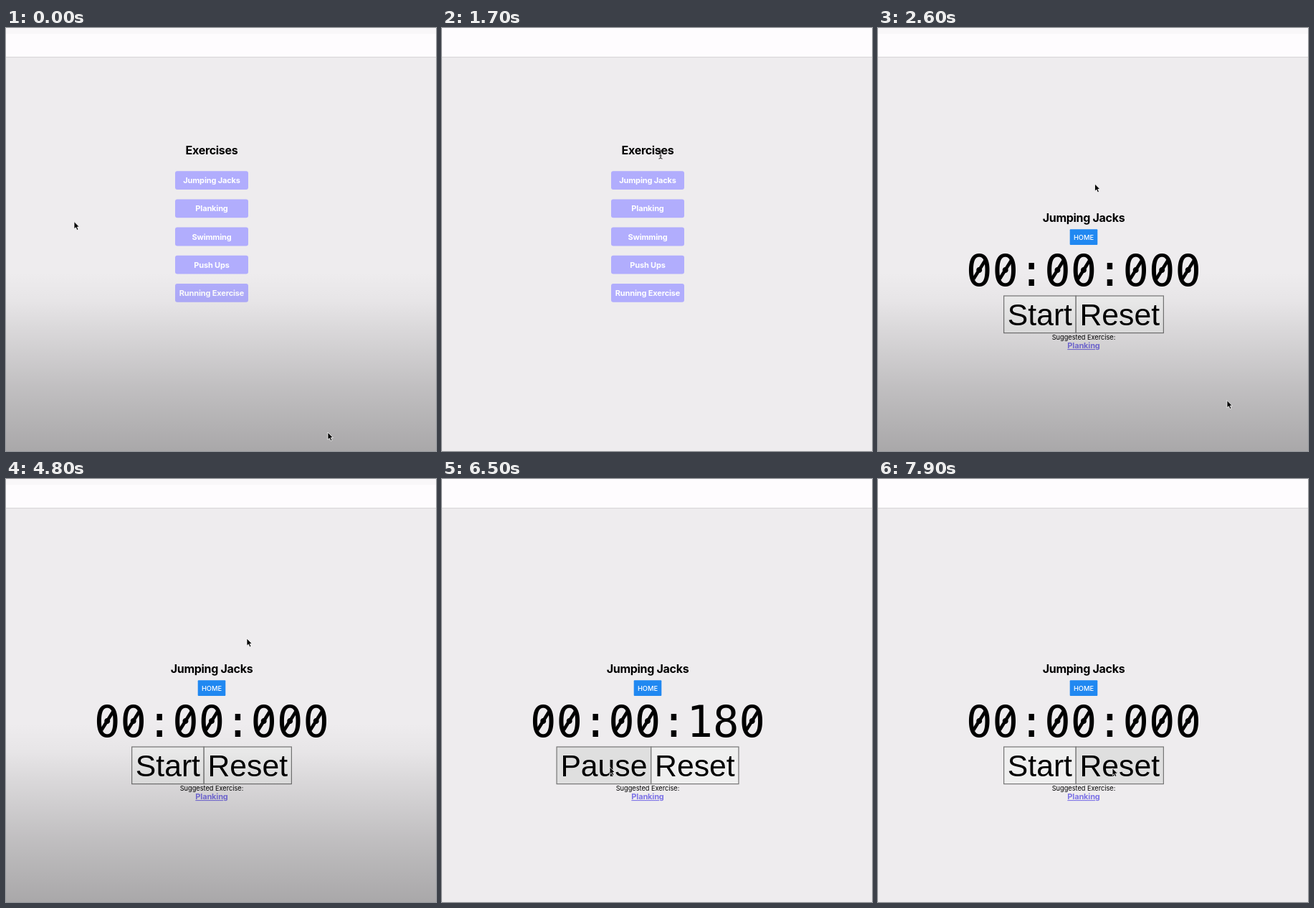
Recreate the animation shown at these times as an HTML page. Size 600 by 589 pixels, loop 8 s.

```html
<!DOCTYPE html>
<html lang="en">
<head>
<meta charset="utf-8">
<title>Exercises</title>
<style>
  html, body { margin: 0; width: 100%; height: 100%; overflow: hidden; background: #eeecee; }
  svg { display: block; width: 100%; height: 100%; }
  text { font-family: Inter, Roboto, sans-serif; text-anchor: middle; }
  .title { font-size: 16px; font-weight: 700; letter-spacing: -.3px; }
  .item { font-size: 11px; font-weight: 700; letter-spacing: -.15px; fill: #fff; }
  .home { font-size: 9.3px; font-weight: 500; fill: #fff; }
  .hint { font-size: 9.2px; }
  .link { font-size: 11px; font-weight: 700; letter-spacing: -.15px; fill: #7d73e6; text-decoration: underline; }
  .digits { font: 60.5px "DejaVu Sans Mono", monospace; }
  .label { font: 42.7px "Liberation Sans", Arial, sans-serif; }
  .btn { stroke: #767676; stroke-width: 1.2; }
</style>
</head>
<body>
<svg viewBox="0 0 600 589">
  <defs>
    <linearGradient id="shade" x1="0" y1="0" x2="0" y2="1">
      <stop offset="0" stop-opacity="0"/>
      <stop offset=".16" stop-opacity=".03"/>
      <stop offset=".32" stop-opacity=".085"/>
      <stop offset=".64" stop-opacity=".19"/>
      <stop offset="1" stop-opacity=".29"/>
    </linearGradient>
    <path id="arrow" d="M0 0V10.2L2.4 8.2L4.1 12L6 11.1L4.3 7.5H7.4Z" stroke="#fff" stroke-width=".8" stroke-linejoin="round"/>
    <path id="beam" d="M-2.5 -6Q0 -6 0 -4.5Q0 -6 2.5 -6M0 -5V5M-2.5 6Q0 6 0 4.5Q0 6 2.5 6M-1.5 2H1.5" fill="none" stroke="#222"/>
    <path id="hand" d="M0 0Q1.2 -1 2 0V4L6.5 5.2Q7.5 5.6 7 8L6 11.5H1L-2.5 7Q-2.5 5.5 0 7Z" fill="#fff" stroke="#000" stroke-width=".9"/>
  </defs>
  <rect width="600" height="589" fill="#eeecee"/>
  <rect width="600" height="40" fill="#fefcfe"/>
  <rect y="40" width="600" height="1.2" fill="#d9d7d9"/>
  <g id="list">
    <text class="title" x="287" y="176">Exercises</text>
  </g>
  <g id="watch">
    <text class="title" x="287" y="270">Jumping Jacks</text>
    <rect x="267.7" y="280.3" width="38.6" height="21.6" rx="1" fill="#2088f1"/>
    <text class="home" x="287" y="294.5">HOME</text>
    <text class="digits" id="digits" x="287" y="359"></text>
    <path id="slashes" fill="none" stroke="#000" stroke-width="4.6"/>
    <rect class="btn" id="goBox" y="373" height="51.6"/>
    <rect class="btn" id="resetBox" y="373" height="51.6"/>
    <text class="label" id="goText" y="413.8"></text>
    <text class="label" id="resetText" y="413.8">Reset</text>
    <text class="hint" x="287" y="434">Suggested Exercise:</text>
    <text class="link" x="287" y="446">Planking</text>
  </g>
  <use id="pointer"/>
  <g id="overlay">
    <rect width="600" height="8" fill="#000" fill-opacity=".02"/>
    <rect y="340" width="600" height="249" fill="url(#shade)"/>
  </g>
  <use id="viewer" href="#arrow"/>
</svg>
<script>
const $ = id => document.getElementById(id);
const LOOP = 8000, STEP = 100, MID = 287, PITCH = 36.42;
const OPEN = 2300, START = 5900, PAUSE = 7350, RESET = 7800;
const RESET_W = 122.2;

$('list').innerHTML += ['Jumping Jacks', 'Planking', 'Swimming', 'Push Ups', 'Running Exercise']
  .map((name, i) => {
    const y = 199.2 + i * 39.2;
    return `<rect x="236" y="${y}" width="102" height="25.8" rx="3" fill="#b1adfd"/>` +
      `<text class="item" x="${MID}" y="${y + 17}">${name}</text>`;
  }).join('');

const linear = p => p;
const smooth = p => p * p * (3 - 2 * p);

// Each key is [time, ...values]
function track(keys, t, ease = smooth) {
  const n = keys.findIndex(k => k[0] > t);
  if (n < 0) return keys[keys.length - 1].slice(1);
  if (n === 0) return keys[0].slice(1);
  const a = keys[n - 1], b = keys[n];
  const p = ease((t - a[0]) / (b[0] - a[0]));
  return a.slice(1).map((v, i) => v + (b[i + 1] - v) * p);
}

const pointerPath = [
  [900, 95, 269.5], [1600, 305, 176], [1700, 305, 176], [2000, 303, 212],
  [2300, 303, 212], [2500, 302.5, 217], [3900, 302.5, 217], [4300, 336, 222],
  [5600, 336, 222], [5900, 234, 401], [7350, 234, 401], [7600, 401, 408],
  [7800, 327, 402.5]
];
const viewerPath = [
  [300, 449, 563], [1800, 480, 512], [2000, 487, 518.5],
  [3900, 487, 518.5], [4300, 514, 518]
];
const fade = [[300, 1], [600, 0], [1700, 0], [1800, 1], [6250, 1], [6500, 0]];
const count = [[START, 0], [6300, 134], [7100, 334], [PAUSE, 396]];

function place(el, x, y) {
  el.setAttribute('transform', `translate(${x} ${y})`);
}

function button(name, x, w, px, py) {
  const over = px > x && px < x + w && py > 373 && py < 425;
  const box = $(name + 'Box');
  box.setAttribute('x', x);
  box.setAttribute('width', w);
  box.setAttribute('fill', over ? '#dfdfdf' : '#efefef');
  $(name + 'Text').setAttribute('x', x + w / 2);
}

function drawWatch(t, px, py) {
  const ms = t >= RESET ? 0 : Math.floor(track(count, t, linear)[0] / 10) * 10;
  const time = '00:00:' + String(ms).padStart(3, '0');
  $('digits').textContent = time;
  $('slashes').setAttribute('d', [...time].map((c, i) => {
    const x = MID + (i - 4) * PITCH;
    return c === '0' ? `M${x - 8} 349.5L${x + 8} 324` : '';
  }).join(''));

  const running = t >= START && t < PAUSE;
  const w = running ? 131.7 : 100.6;
  const left = MID - (w + RESET_W) / 2;
  $('goText').textContent = running ? 'Pause' : 'Start';
  button('go', left, w, px, py);
  button('reset', left + w, RESET_W, px, py);
}

function draw(t) {
  const opened = t >= OPEN;
  $('list').style.display = opened ? 'none' : '';
  $('watch').style.display = opened ? '' : 'none';

  const [px, py] = track(pointerPath, t);
  const onTitle = !opened && px > 251 && px < 323 && py > 160 && py < 186;
  const onItem = !opened && px > 236 && px < 338 && py > 199 && py < 382;
  $('pointer').setAttribute('href', onTitle ? '#beam' : onItem ? '#hand' : '#arrow');
  place($('pointer'), px, py);
  if (opened) drawWatch(t, px, py);

  $('overlay').setAttribute('opacity', track(fade, t, linear)[0]);
  $('viewer').style.display = t < 500 || (t >= 1800 && t < 4500) ? '' : 'none';
  place($('viewer'), ...track(viewerPath, t));
}

const begin = performance.now();
function tick() {
  const t = (performance.now() - begin) % LOOP;
  draw(Math.floor(t / STEP) * STEP);
  requestAnimationFrame(tick);
}
tick();
</script>
</body>
</html>
```
